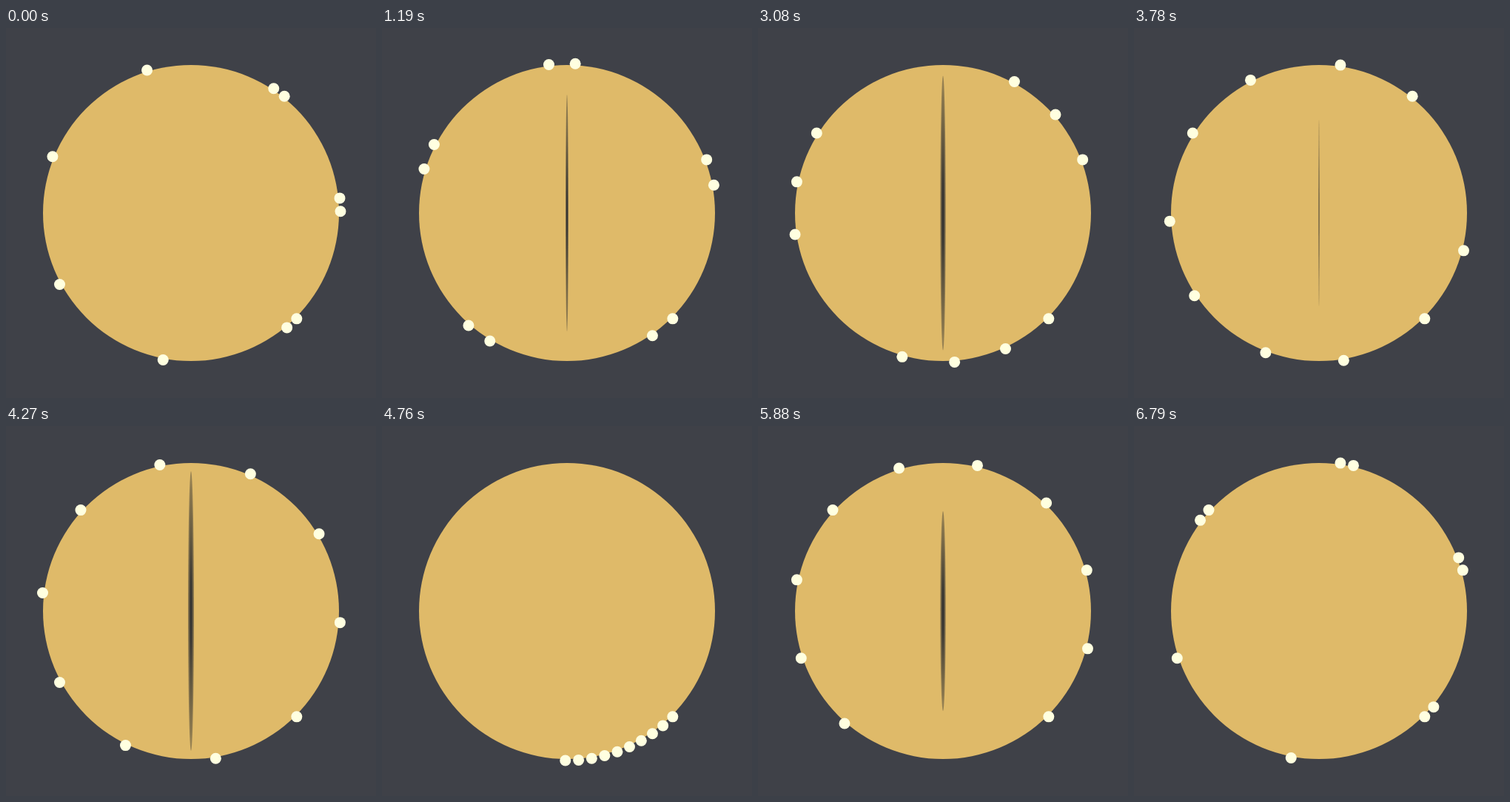
An HTML page that plays this animation: 500 px wide and 500 px high, repeating every 6.86 s.

```html
<!DOCTYPE html>
<html lang="en">
<head>
<meta charset="utf-8">
<title>Beads around an eye</title>
<style>
html, body { margin: 0; width: 100%; height: 100%; overflow: hidden; background: #3f4148; }
svg { display: block; width: 100vw; height: 100vh; }
</style>
</head>
<body>
<svg viewBox="0 0 500 500">
  <defs>
    <radialGradient id="slit">
      <stop offset="0" stop-color="#303030"/>
      <stop offset="0.25" stop-color="#303030" stop-opacity="0.95"/>
      <stop offset="1" stop-color="#303030" stop-opacity="0.38"/>
    </radialGradient>
  </defs>
  <rect width="500" height="500" fill="#3f4148"/>
  <circle cx="250" cy="250" r="200" fill="#dfba69"/>
  <ellipse id="pupil" cx="250" cy="250" fill="url(#slit)"/>
  <g id="beads" fill="#ffffe0"></g>
</svg>
<script>
const LOOP = 6860, TICK = 70;
const SLOTS = 71, COUNT = 10, RING = 202;
const FULL_W = 8, FULL_H = 378;

// Each blink, in ticks: start, fully open, begins to narrow, gone.
const BLINKS = [
  [8, 12, 12, 22],
  [24, 27, 27, 30.5],
  [35, 43, 43, 56.5],
  [56.5, 61, 62, 68],
  [68.5, 73, 74, 77],
  [78.5, 86.2, 94.5, 97]
];

const pupil = document.getElementById("pupil");
const group = document.getElementById("beads");
const beads = Array.from({ length: COUNT }, () => {
  const dot = document.createElementNS("http://www.w3.org/2000/svg", "circle");
  dot.setAttribute("r", 7.5);
  return group.appendChild(dot);
});

// Slots between neighbouring beads; shrinks by 6 on every beat.
function spacing(tick) {
  const beat = Math.max(0, Math.floor((tick - 0.3) / 7.5) + 1);
  return beat < 11 ? 61 - 6 * beat : 71 - 6 * (beat - 11);
}

function pupilSize(tick) {
  if (tick >= 31 && tick < 36) return [6, 14];
  const blink = BLINKS.find(b => tick > b[0] && tick < b[3]);
  if (!blink) return [0, 0];
  const [start, open, narrow, end] = blink;
  if (tick < open) {
    const k = (tick - start) / (open - start);
    return [FULL_W * (0.75 + 0.25 * k), FULL_H * k];
  }
  const k = tick < narrow ? 1 : (end - tick) / (end - narrow);
  return [FULL_W * k, FULL_H * Math.pow(k, 0.24)];
}

function draw(ms) {
  const tick = Math.floor((ms % LOOP) / TICK);
  const step = spacing(tick);
  beads.forEach((dot, i) => {
    const angle = Math.PI / 4 + (i * step % SLOTS) * 2 * Math.PI / SLOTS;
    dot.setAttribute("cx", 250 + RING * Math.cos(angle));
    dot.setAttribute("cy", 250 + RING * Math.sin(angle));
  });
  const [w, h] = pupilSize(tick);
  pupil.setAttribute("rx", w / 2);
  pupil.setAttribute("ry", h / 2);
}

const begin = performance.now();
function loop() {
  draw(performance.now() - begin);
  requestAnimationFrame(loop);
}
loop();
</script>
</body>
</html>
```
